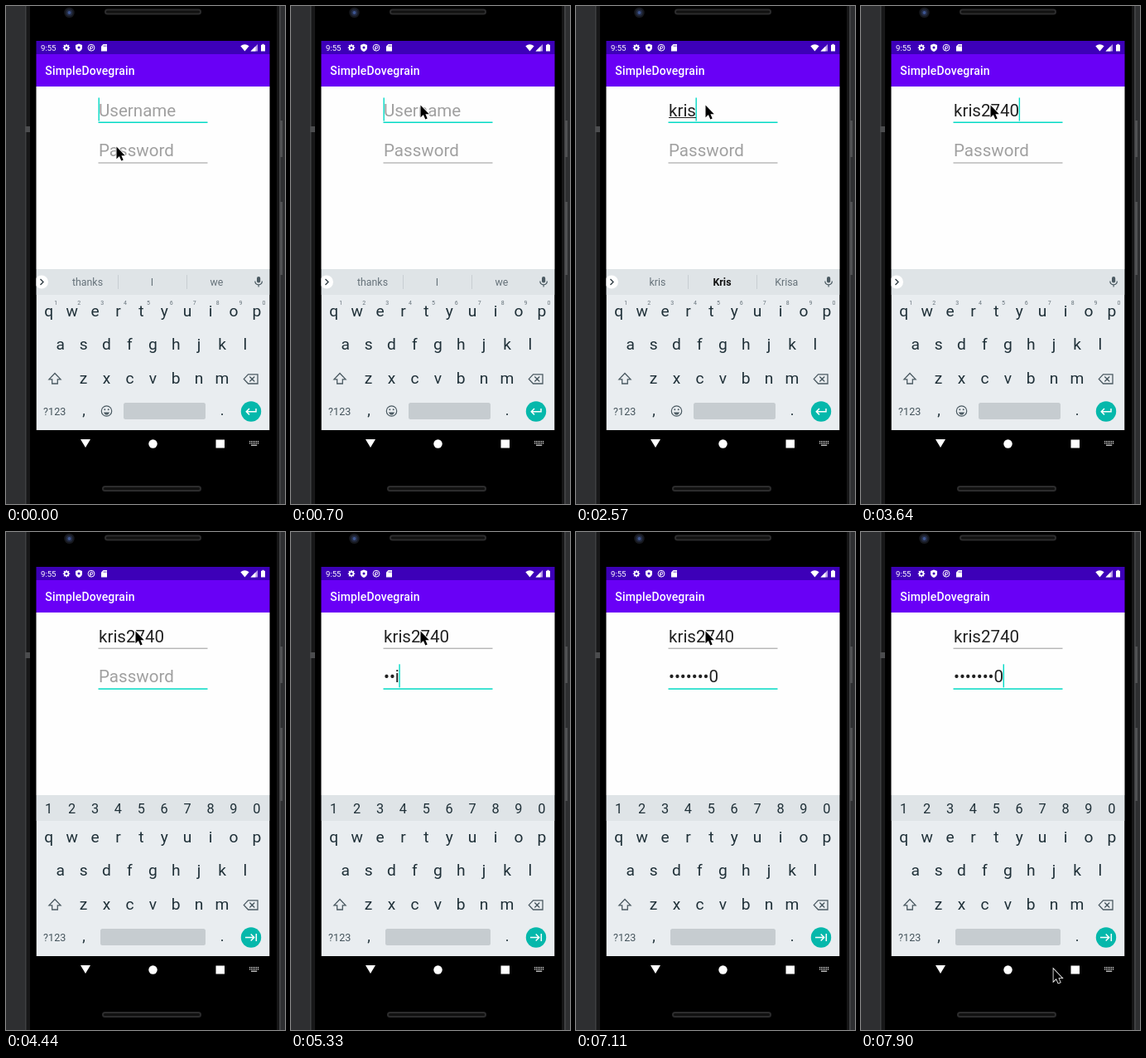
An HTML page with a canvas that plays this animation: 337 px wide and 600 px high, repeating every 7.99 s.

```html
<!DOCTYPE html>
<html lang="en">
<head>
<meta charset="utf-8">
<title>Login form</title>
<style>
html, body { margin: 0; width: 100%; height: 100%; overflow: hidden; background: #2e2f31; }
canvas { display: block; width: 337px; height: 600px; }
</style>
</head>
<body>
<canvas id="stage"></canvas>
<script>
const W = 337, H = 600, LOOP = 7990;
const canvas = document.getElementById('stage');
const ctx = canvas.getContext('2d');
const dpr = window.devicePixelRatio || 1;
canvas.width = W * dpr;
canvas.height = H * dpr;

const FONT = 'Roboto, "Open Sans", sans-serif';
const TEAL = '#03dac5', INK = '#212121', KEY = '#1f3038', ICON = '#4b5a62';
const FIELD_X = 112, FIELD_SIZE = 20.55;
const USER = 'kris2740', SECRET = 'kris2740';

// Times at which each character appears
const userTimes = [1950, 2220, 2400, 2570, 3020, 3190, 3370, 3640];
const secretTimes = [4980, 5150, 5330, 5510, 5950, 6310, 6390, 6570];
const FOCUS = 3990, SWAP = 4170;
const caretOff = [[180, 610], [1330, 1770], [4440, 4980], [7110, 7640]];

const pointerPath = [
  [0, 133, 169], [90, 134, 184], [180, 138, 168], [270, 147, 143], [350, 153, 126], [440, 156, 119],
  [7290, 158, 124], [7380, 168, 155], [7460, 182, 203],
  [7640, 196, 290], [7730, 213, 405], [7820, 228, 500], [7900, 232, 526]
];

const suggestions = [
  [0, 'thanks', 'I', 'we'],
  [1950, 'k', 'know', 'keep'],
  [2220, 'kr', 'Kris', 'krill'],
  [2400, 'kri', 'Kris', 'krill'],
  [2570, 'kris', 'Kris', 'Krisa'],
  [3020, 'kris2', 'Kris', 'Krisa'],
  [3190, 'kris27', 'Kris', 'Krisalo'],
  [3460, '', '', '']
];

const at = (list, t) => list.filter(k => k[0] <= t).pop();
const typed = (times, t) => times.filter(k => k <= t).length;

function rect(x, y, w, h, color) {
  ctx.fillStyle = color;
  ctx.fillRect(x, y, w, h);
}

function round(x, y, w, h, r, color) {
  ctx.fillStyle = color;
  ctx.beginPath();
  ctx.roundRect(x, y, w, h, r);
  ctx.fill();
}

function disc(x, y, r, color) {
  ctx.fillStyle = color;
  ctx.beginPath();
  ctx.arc(x, y, r, 0, Math.PI * 2);
  ctx.fill();
}

function ring(x, y, r, color, width) {
  ctx.strokeStyle = color;
  ctx.lineWidth = width;
  ctx.beginPath();
  ctx.arc(x, y, r, 0, Math.PI * 2);
  ctx.stroke();
}

function fillPath(d, color) {
  ctx.fillStyle = color;
  ctx.fill(new Path2D(d));
}

function strokePath(d, color, width) {
  ctx.strokeStyle = color;
  ctx.lineWidth = width;
  ctx.stroke(new Path2D(d));
}

function text(s, x, y, size, color, align = 'left', weight = 400) {
  ctx.font = `${weight} ${size}px ${FONT}`;
  ctx.fillStyle = color;
  ctx.textAlign = align;
  ctx.fillText(s, x, y);
}

function fieldWidth(s) {
  ctx.font = `400 ${FIELD_SIZE}px ${FONT}`;
  return ctx.measureText(s).width;
}

function grille(x, y, w) {
  round(x, y, w, 7, 3.5, '#2c2c2d');
  round(x + 2, y + 2, w - 4, 3, 1.5, '#111');
}

function drawPhone() {
  rect(0, 0, W, H, '#2e2f31');
  rect(23, 0, 309, H, '#3f4042');
  rect(24.5, 0, 305.5, H, '#171718');
  rect(29, 0, 298, H, '#000');
  rect(23, 145, 6, 7, '#4b4c4e');
  rect(331, 138, 3, 44, '#505153');
  rect(331, 236, 3, 88, '#505153');
  grille(119, 3.5, 117);
  grille(116, 578, 120);
  disc(76.5, 8, 6.2, '#17191f');
  disc(76.5, 8, 4, '#232b42');
  disc(76.5, 8, 2, '#3d5590');
}

function drawStatusBar() {
  rect(36.5, 42, 282, 16, '#3d00b8');
  text('9:55', 42, 54, 9.6, '#fff');
  // gear
  ring(73, 50.2, 2.4, '#fff', 1.7);
  for (let i = 0; i < 8; i++) {
    const a = i * Math.PI / 4;
    disc(73 + 3.6 * Math.cos(a), 50.2 + 3.6 * Math.sin(a), .8, '#fff');
  }
  // shield
  fillPath('M88 45.5L92 47V50Q92 53.6 88 55Q84 53.6 84 50V47Z', '#fff');
  disc(88, 50, 1.5, '#3d00b8');
  // round notice
  ring(103, 50.2, 3.9, '#fff', 1);
  ring(103.3, 49.8, 1.5, '#fff', 1);
  strokePath('M101.8 50V53', '#fff', 1);
  // memory card
  fillPath('M117.5 46H122V54.5H115V48.5Z', '#fff');
  strokePath('M118 47.3V49.2M119.5 47.3V49.2M121 47.3V49.2', '#3d00b8', .6);
  // wifi, signal, battery
  fillPath('M283.3 48.3Q288.4 44.2 293.6 48.3L288.4 54.6Z', '#fff');
  fillPath('M304 46V54.5H295.5Z', '#b99be8');
  fillPath('M301.5 48.5V54.5H295.5Z', '#fff');
  rect(308, 46.8, 5, 7.7, '#fff');
  rect(309.5, 45.8, 2, 1.2, '#fff');
}

function drawAppBar() {
  rect(36.5, 58, 282, 39, '#6900f6');
  ctx.letterSpacing = '0.15px';
  text('SimpleDovegrain', 47.3, 83, 14, '#fff', 'left', 500);
  ctx.letterSpacing = '0px';
}

function drawField(value, hint, base, focused, showCaret) {
  text(value || hint, FIELD_X, base, FIELD_SIZE, value ? INK : '#a0a0a0');
  if (focused) rect(111.5, base + 7, 132, 1.5, TEAL);
  else rect(111.5, base + 7.2, 132, 1, '#9a9a9a');
  if (showCaret) rect(FIELD_X - .5 + fieldWidth(value), base - 22, 1.4, 28, TEAL);
}

function drawFields(t) {
  const caret = !caretOff.some(([a, b]) => t >= a && t < b);
  const onUser = t < FOCUS;
  const name = USER.slice(0, typed(userTimes, t));
  const n = typed(secretTimes, t);
  const masked = n ? '•'.repeat(n - 1) + SECRET[n - 1] : '';
  drawField(name, 'Username', 132.5, onUser, onUser && caret);
  if (name && t < 3460) rect(FIELD_X, 134, fieldWidth(name), 1, INK);
  drawField(masked, 'Password', 181.3, !onUser, !onUser && caret);
}

function drawStrip(t) {
  const [time, left, mid, right] = at(suggestions, t);
  disc(43, 332.5, 8, '#fff');
  strokePath('M41.5 329L45 332.5L41.5 336', '#333f46', 1.4);
  const grey = '#66727a';
  text(left, 98.5, 337, 12.35, grey, 'center');
  const bold = time >= 2570;
  text(mid, 176.5, 337, 12.35, bold ? '#111' : grey, 'center', bold ? 700 : 400);
  text(right, 254.3, 337, 12.35, grey, 'center');
  if (left) {
    rect(135, 324, 1, 17, '#c8ced2');
    rect(218, 324, 1, 17, '#c8ced2');
  }
  round(303, 326, 4.2, 7.6, 2.1, ICON);
  strokePath('M300.8 331.5Q301 335.6 305.1 335.8Q309.2 335.6 309.4 331.5M305.1 335.8V338.6', ICON, 1.2);
}

function keyRow(keys, x, base, size) {
  [...keys].forEach((k, i) => text(k, x + i * 27.9, base, size, KEY, 'center'));
}

function drawKeyboard(t) {
  const secure = t >= SWAP;
  ctx.save();
  ctx.beginPath();
  ctx.rect(36.5, 317, 282, 194);
  ctx.clip();
  rect(36.5, 317, 282, 194, '#e9edf0');
  rect(36.5, 317, 282, 31, '#dfe4e7');

  if (secure) keyRow('1234567890', 51.7, 339, 16.3);
  else {
    drawStrip(t);
    [...'1234567890'].forEach((d, i) => text(d, 60.3 + i * 27.9, 360, 7, '#66727a', 'center'));
  }
  keyRow('qwertyuiop', 51.7, 374, 19.2);
  keyRow('asdfghjkl', 65.7, 414, 19.2);
  keyRow('zxcvbnm', 93.6, 455, 19.2);

  // shift and backspace
  strokePath('M59 442.5L66 449.8H62.3V455H55.7V449.8H52Z', ICON, 1.3);
  strokePath('M292.5 443.8H304V455H292.5L287.3 449.4ZM294.3 446.5L300.3 452.5M300.3 446.5L294.3 452.5', ICON, 1.3);

  text('?123', 58.7, 493, 12.6, '#45545c', 'center');
  text(',', 94, 493, 18, KEY, 'center');
  text('.', 261, 493, 18, KEY, 'center');
  const left = secure ? 114 : 142;
  round(left, 478, 241 - left, 20, 2.5, '#c6ccd0');
  if (!secure) {
    ring(121.5, 488, 6.2, ICON, 1.2);
    disc(119.3, 486.2, 1, ICON);
    disc(123.7, 486.2, 1, ICON);
    fillPath('M118 489.5H125Q124 492.6 121.5 492.6Q119 492.6 118 489.5Z', ICON);
  }

  disc(296, 488.5, 12.2, '#05b8ab');
  strokePath(secure
    ? 'M289 488.5H299.5M295.7 484.5L299.7 488.5L295.7 492.5M302.3 484V493'
    : 'M302 485V488.7H290.5M294 485L290.3 488.7L294 492.4', '#fff', 1.5);
  ctx.restore();
}

function drawNavBar() {
  rect(36.5, 511, 282, 34, '#000');
  fillPath('M90 522H102L96 532Z', '#fff');
  disc(177.5, 527.5, 5.2, '#fff');
  rect(253.5, 522.5, 10.5, 10, '#fff');
  for (let r = 0; r < 2; r++)
    for (let c = 0; c < 6; c++) rect(294 + c * 2, 524 + r * 2.2, 1.2, 1.3, '#ddd');
  rect(296, 528.6, 7.2, 1.2, '#ddd');
}

function drawPointer(t) {
  const [, x, y] = at(pointerPath, t);
  ctx.save();
  ctx.translate(x + .5, y + .5);
  const shape = new Path2D('M0 0V14.8L3.4 11.6L5.8 17L8.2 16L5.9 10.7H10.3Z');
  ctx.lineJoin = 'miter';
  ctx.strokeStyle = '#fff';
  ctx.lineWidth = 1.6;
  ctx.stroke(shape);
  ctx.fillStyle = '#000';
  ctx.fill(shape);
  ctx.restore();
}

function draw(now) {
  const t = now % LOOP;
  ctx.setTransform(dpr, 0, 0, dpr, 0, 0);
  drawPhone();
  rect(36.5, 97, 282, 220, '#fefefe');
  drawStatusBar();
  drawAppBar();
  drawFields(t);
  drawKeyboard(t);
  drawNavBar();
  drawPointer(t);
}

let start;
function tick(now) {
  start ??= now;
  draw(Math.max(0, now - start));
  requestAnimationFrame(tick);
}
draw(0);
requestAnimationFrame(tick);
</script>
</body>
</html>
```
